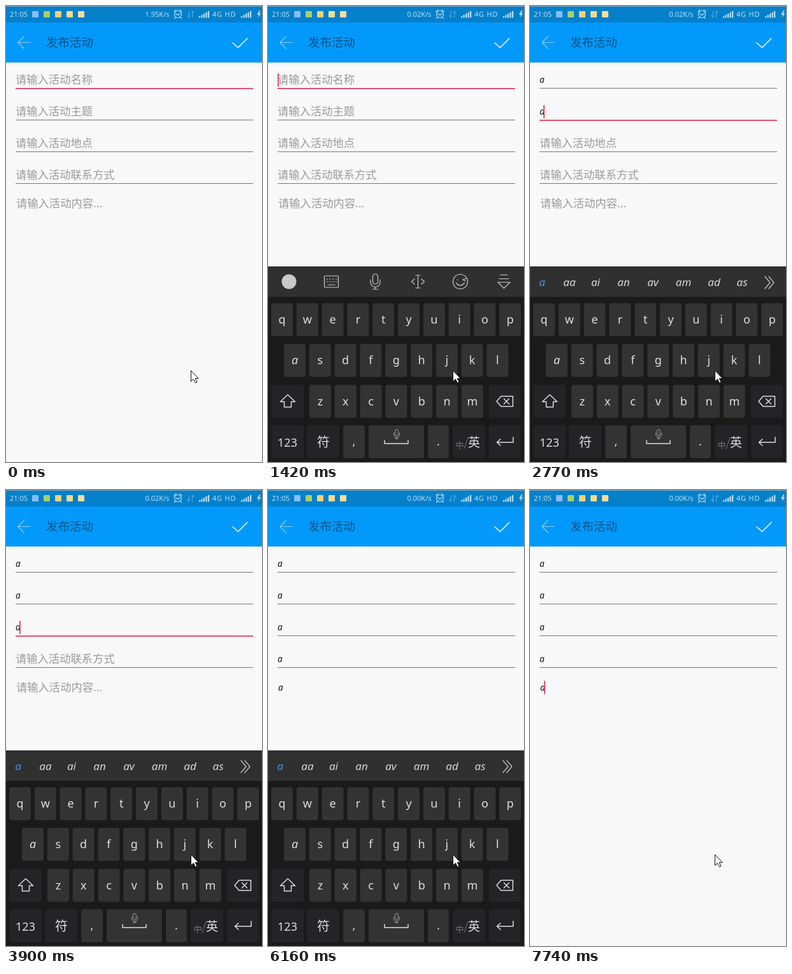
Write an HTML page that moves like this. It is 402 by 718 pixels and loops after 7.99 s.

```html
<!DOCTYPE html>
<html lang="zh-CN">
<head>
<meta charset="utf-8">
<title>发布活动</title>
<style>
  html, body { margin: 0; width: 100%; height: 100%; overflow: hidden; background: #f8f8f8; }
  svg { display: block; width: 100%; height: 100%; }
  text { font-family: "Noto Sans", "Noto Sans CJK SC", "Noto Sans CJK", sans-serif; }
  .cjk { font-family: "Noto Sans CJK SC", "Noto Sans CJK", sans-serif; font-weight: 300; }
  .status { font-size: 11px; fill: #b9e0f5; }
  .hint { font-size: 17.3px; fill: #9a9a9a; }
  .typed { font-size: 13.5px; font-style: italic; fill: #111; }
  .key { font-size: 18px; font-weight: 300; fill: #dedede; text-anchor: middle; }
  .single { font-style: italic; }
  .candidate { font-size: 17px; font-weight: 300; font-style: italic; fill: #d8d8d8; text-anchor: middle; }
  .line { fill: none; stroke-linecap: round; stroke-linejoin: round; }
  .icon { stroke: #c9c9c9; stroke-width: 1.2; }
</style>
</head>
<body>
<svg id="stage" viewBox="0 0 402 718"></svg>
<script>
const LOOP = 7990;
const KEYBOARD_TRAVEL = 308;
const HINTS = ["请输入活动名称", "请输入活动主题", "请输入活动地点", "请输入活动联系方式", "请输入活动内容..."];
const FOCUS_AT = [0, 2000, 3050, 4150, 5110];
const TYPED_AT = [1540, 2490, 3620, 4690, 5510];
const PINK = "#e2506f";

const rect = (x, y, w, h, fill, r = 0, more = "") =>
  `<rect x="${x}" y="${y}" width="${w}" height="${h}" rx="${r}" fill="${fill}" ${more}/>`;
const text = (x, y, content, cls, more = "") =>
  `<text x="${x}" y="${y}" class="${cls}" ${more}>${content}</text>`;
const path = (d, cls = "line icon", more = "") => `<path d="${d}" class="${cls}" ${more}/>`;
const circle = (x, y, r, cls = "line icon", more = "") =>
  `<circle cx="${x}" cy="${y}" r="${r}" class="${cls}" ${more}/>`;

const signal = x => [0, 1, 2, 3, 4].map(i =>
  rect(x + i * 3.5, 16 - i * 2, 2.2, 2.5 + i * 2, "#b9e0f5")).join("");

const microphone = (x, y, scale) =>
  `<g transform="translate(${x} ${y}) scale(${scale})">` +
  rect(-4, -12, 8, 16, "none", 4, 'class="icon"') +
  path("M-7.5-3V1a7.5 7.5 0 0 0 15 0V-3M0 8.5V12M-4 12H4") + "</g>";

function statusBar() {
  const squares = ["#86bdfb", "#a5d06c", "#efd279", "#efdb91", "#f2dda0"];
  const stroke = 'stroke="#b9e0f5" stroke-width="1.2"';
  return rect(0, 0, 402, 26, "#0580cb") + rect(0, 0, 402, 1, "#8ba3ae") +
    text(6, 17, "21:05", "status") +
    squares.map((color, i) => rect(41 + i * 18, 8, 10, 10, color, 1)).join("") +
    text(256.5, 17, "", "status", 'id="speed" text-anchor="end"') +
    circle(270, 13, 5.5, "line", stroke) +
    path("M267 12l3 2.5 3-2.5M264 9l3-3M276 9l-3-3M266 18l-1.5 1.5M274 18l1.5 1.5", "line", stroke) +
    path("M287.5 8v10l-2.5-3M292.5 18V8l2.5 3", "line", 'stroke="#55a9dc" stroke-width="1.2"') +
    signal(303) + text(324, 17, "4G HD", "status", 'letter-spacing=".8"') + signal(369) +
    path("M398 7l-4 6.5h3l-1.5 5 5-7h-3l2-4.5z", "", 'fill="#b9e0f5"');
}

function header() {
  return rect(0, 26, 402, 63, "#0399fb") +
    path("M38 57.5H19M28 48l-9 9.5 9 9.5", "line", 'stroke="#8dcdf7" stroke-width="1.2"') +
    text(63, 63.5, "发布活动", "cjk", 'font-size="18.5" fill="#075388"') +
    path("M356 58l8.5 7.5L379 51", "line", 'stroke="#e9f6ff" stroke-width="1.6"');
}

function field(hint, i) {
  const last = i === 4;
  const baseline = last ? 316.5 : 122 + i * 50;
  return text(last ? 16 : 15, baseline, hint, "cjk hint", `id="hint${i}"`) +
    text(last ? 16 : 15, baseline - 1, "a", "typed", `id="typed${i}"`) +
    (last ? "" : rect(15, 129 + i * 50, 373, 1, "#777", 0, `id="rule${i}"`));
}

function key(x, y, w, label = "", dark = false, cls = "") {
  return rect(x, y, w, 52, dark ? "#242426" : "#333334", 4) +
    text(x + w / 2, y + 32, label, "key " + cls);
}

const keyRow = (letters, x, y) => [...letters].map((letter, i) =>
  key(x + i * 39.8, y, 34, letter, false, letter === "a" ? "single" : "")).join("");

function toolbar() {
  return circle(33, 434, 11.5, "", 'fill="#c9c9c9"') +
    rect(88.5, 425, 22, 18, "none", 1, 'class="icon"') +
    path("M92 430H108M92 434H108", "line icon", 'stroke-dasharray="1.5 3.3"') + path("M94 439H105") +
    microphone(168.5, 434, 1) +
    path("M235.5 424v20M232 424h7M232 444h7M230 430l-4.5 4 4.5 4M241 430l4.5 4-4.5 4") +
    circle(302, 434, 11.5) +
    path("M295.5 436q6.5 8 13 0M297 431h1M311 429l-5 2 4 2") +
    path("M365 423.5h11M363 429.5h15M361 435h19l-9.5 9.5z");
}

function candidates() {
  const words = { a: 19, aa: 62, ai: 103, an: 147, av: 193, am: 241, ad: 289, as: 333 };
  return Object.entries(words).map(([word, x]) =>
    text(x, 441, word, "candidate", word === "a" ? 'style="fill:#4593e5"' : "")).join("") +
    path("M369 426l8 9.5-8 9.5M375 426l8 9.5-8 9.5");
}

function keyboard() {
  return rect(0, 410, 402, 308, "#1a1a1a") + rect(0, 410, 402, 48, "#303031") +
    `<g id="toolbar">${toolbar()}</g><g id="candidates">${candidates()}</g>` +
    keyRow("qwertyuiop", 5, 468) + keyRow("asdfghjkl", 25, 532) +
    key(5, 596.5, 51, "", true) + keyRow("zxcvbnm", 65, 596.5) + key(347, 596.5, 50, "", true) +
    path("M31 612l-11.5 11h6v8.5h11V623h6z", "line", 'stroke="#ddd" stroke-width="1.5"') +
    path("M359 622.5l7-8h18.5v16H366zM370.5 618.5l8 8M378.5 618.5l-8 8", "line", 'stroke="#ddd" stroke-width="1.5"') +
    key(5, 660, 51, "", true) + text(30.5, 694, "123", "key", 'style="font-weight:400"') +
    key(61, 660, 51, "", true) + text(87, 694, "符", "key cjk", 'style="font-size:20px"') +
    key(118, 660, 34, ",") + key(158, 660, 87) + key(251, 660, 33, ".") +
    microphone(202, 674, 0.6) +
    path("M183 684v5h37v-5", "line", 'stroke="#ddd" stroke-width="1.5"') +
    key(290, 660, 51, "", true) +
    text(301, 696, "中", "key cjk", 'style="font-size:13px;fill:#777"') +
    path("M308 697l6-17", "line", 'stroke="#777"') +
    text(323.5, 694, "英", "key cjk", 'style="font-size:19px"') +
    key(347, 660, 50, "", true) +
    path("M385 679v8h-25M365 682l-5.5 5 5.5 5", "line", 'stroke="#ddd" stroke-width="1.5"');
}

document.getElementById("stage").innerHTML =
  rect(0, 0, 402, 718, "#f8f8f8") + statusBar() + header() + HINTS.map(field).join("") +
  rect(15, 106, 2, 21, PINK, 0, 'id="caret"') +
  `<g id="keyboard">${keyboard()}</g>` +
  path("M290.5 574v17l4-3.5 3 6 2.5-1.2-2.8-5.8h5z", "", 'fill="#fff" stroke="#111" stroke-width="1"');

const $ = id => document.getElementById(id);
const show = (id, visible) => $(id).setAttribute("visibility", visible ? "visible" : "hidden");
const set = (id, attributes) => {
  for (const name in attributes) $(id).setAttribute(name, attributes[name]);
};
const progress = (t, start, duration) => Math.min(1, Math.max(0, (t - start) / duration));

function render(t) {
  const focus = FOCUS_AT.filter(at => at <= t).length - 1;
  const composing = t >= TYPED_AT[focus];

  HINTS.forEach((_, i) => {
    const typed = t >= TYPED_AT[i];
    show("hint" + i, !typed);
    show("typed" + i, typed);
    if (i < 4) {
      const active = i === focus;
      set("rule" + i, { fill: active ? PINK : "#777", height: active ? 2 : 1 });
    }
  });

  // The caret restarts its half-second blink on every edit or focus change.
  const lastEdit = Math.max(360, ...[...FOCUS_AT, ...TYPED_AT].filter(at => at <= t));
  show("caret", t >= 360 && (t - lastEdit) % 1000 < 500);
  set("caret", {
    x: (focus === 4 ? 16 : 15) + (composing ? 6 : 0),
    y: focus === 4 ? 300.5 : 106 + focus * 50
  });

  const opening = 1 - (1 - progress(t, 645, 250)) ** 2;
  const closing = progress(t, 7400, 270) ** 2;
  set("keyboard", { transform: `translate(0 ${KEYBOARD_TRAVEL * (1 - opening + closing)})` });
  show("toolbar", !composing);
  show("candidates", composing);
  $("speed").textContent = t < 1270 ? "1.95K/s" : t < 5100 ? "0.02K/s" : "0.00K/s";
}

const start = performance.now();
function tick() {
  render((performance.now() - start) % LOOP);
  requestAnimationFrame(tick);
}
tick();
</script>
</body>
</html>
```
